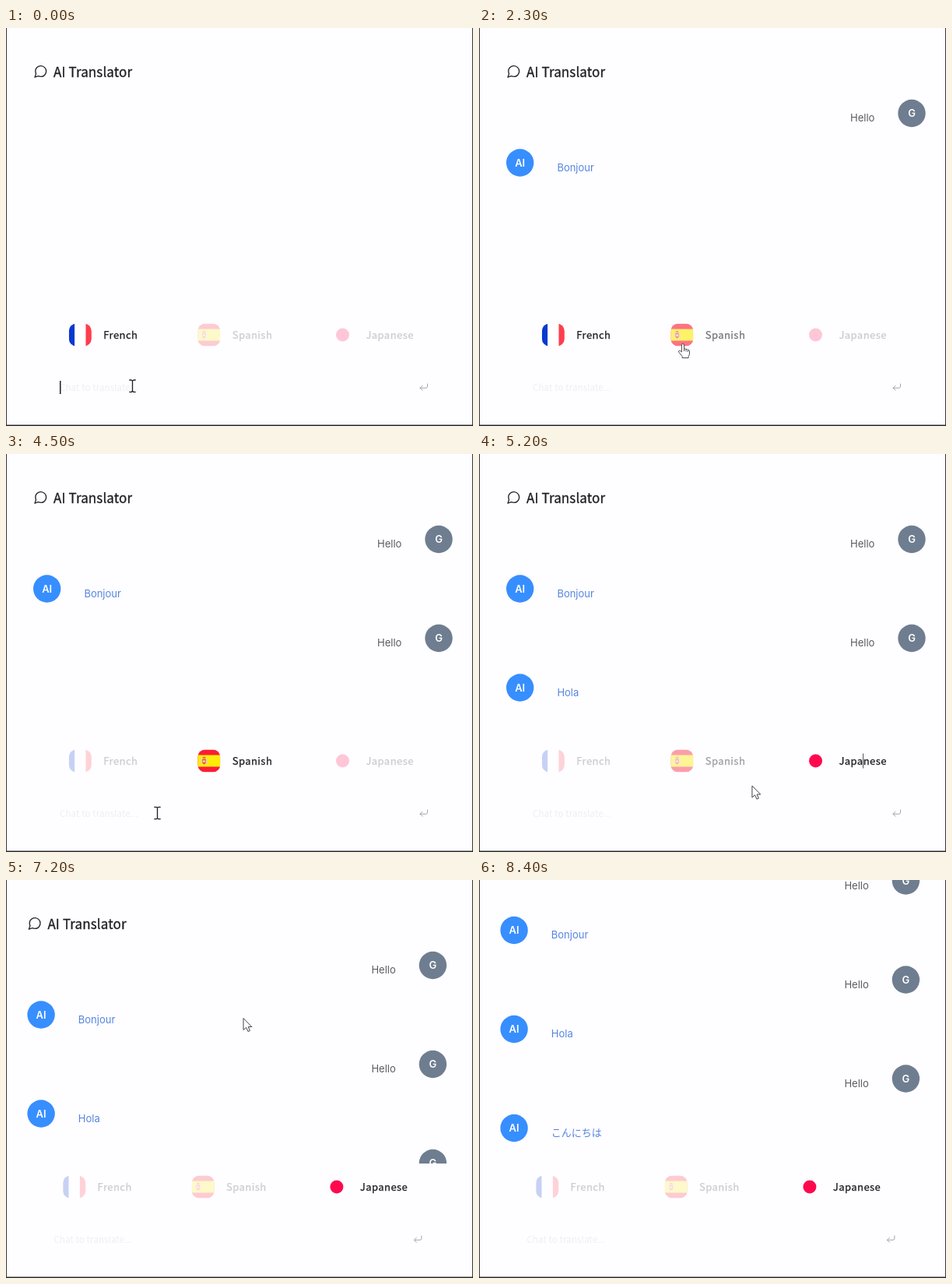
Write an HTML page that moves like this. It is 600x511 px and loops after 9.4 s.

```html
<!DOCTYPE html>
<html lang="en">
<head>
<meta charset="utf-8">
<title>AI Translator</title>
<style>
  html, body { margin: 0; width: 100%; height: 100%; overflow: hidden; background: #fefdff; }
  svg { display: block; }
  .ui { font-family: "Noto Sans CJK JP", "Noto Sans CJK", "Noto Sans", sans-serif; }
  .title { font-size: 17px; letter-spacing: .12px; fill: #1f1d21; stroke: #1f1d21; stroke-width: .3; }
  .tab { font-size: 13px; letter-spacing: .45px; fill: #1c1a1e; stroke: #1c1a1e; stroke-width: .25; }
  .hint { font-size: 11.5px; letter-spacing: .12px; fill: #f1edf3; }
  .chat { font: 13px Inter, "Noto Sans CJK JP", "Noto Sans CJK", sans-serif; }
  .badge { font: 600 13px Inter, sans-serif; fill: #fff; text-anchor: middle; }
  .line { fill: none; stroke-linecap: round; stroke-linejoin: round; }
</style>
</head>
<body>
<svg width="600" height="511" viewBox="0 0 600 511">
  <defs>
    <clipPath id="view"><rect width="600" height="364"/></clipPath>
    <clipPath id="round"><rect width="29" height="29" rx="9.5"/></clipPath>
  </defs>
  <rect width="600" height="511" fill="#fefdff"/>
  <g clip-path="url(#view)">
    <g id="page">
      <path class="line" transform="translate(34.6 46.2) scale(.81)" stroke="#29262b" stroke-width="1.7"
        d="M21 11.5a8.4 8.4 0 0 1-.9 3.8 8.5 8.5 0 0 1-7.6 4.7 8.4 8.4 0 0 1-3.8-.9L3 21l1.9-5.7a8.4 8.4 0 0 1-.9-3.8 8.5 8.5 0 0 1 4.7-7.6 8.4 8.4 0 0 1 3.8-.9h.5a8.5 8.5 0 0 1 8 8z"/>
      <text class="ui title" x="61" y="63">AI Translator</text>
      <g id="messages"></g>
    </g>
  </g>
  <g id="dock">
    <g class="ui" id="tabs"></g>
    <text class="ui hint" id="hint" x="69" y="466">Chat to translate...</text>
    <text class="ui" id="entry" x="69" y="466" font-size="12" fill="#343136"></text>
    <rect id="caret" y="453" width="1.5" height="17" fill="#222"/>
    <path class="line" stroke="#a5a2a8" d="M541.5 457v3.2q0 2-2 2h-7.5m3-3-3 3 3 3"/>
  </g>
  <path id="trace" d="M493.5 384.5v19" stroke="#55525a"/>
  <g id="pointer" stroke-linejoin="round">
    <path id="arrow" fill="#fff" stroke="#444148" d="M0 0V15L3.6 11.8 6 17 8.4 16 6.2 11H10.8Z"/>
    <path id="beam" fill="none" stroke="#1f1d21" stroke-width="1.3" d="M-4.2-7.7h2.7L0-6.7l1.5-1h2.7M0-6.7V6.7M-4.2 7.7h2.7L0 6.7l1.5 1h2.7"/>
    <path id="hand" transform="scale(.95)" fill="#fff" stroke="#444148" d="M-1.7 1.2Q-1.5-.2 0 0t1.6 1.6V7q1.5-1.1 2.6.5 1.5-.9 2.4.7 2.2-.5 2.3 1.6v3.4q0 2-1.4 3.6V19H-.9v-2L-5.3 11.6q-1.2-1.8.3-2.4 1.4-.4 3.3 1.8ZM1.6 7v3M4.2 8v2.3M6.6 9v2"/>
  </g>
  <path d="M.5 0V511M599.5 0V511" stroke="#39373b"/>
  <rect y="509.5" width="600" height="1.5" fill="#29272b"/>
</svg>
<script>
const LOOP = 9400, STEP = 100, DIM = .22, WORD = "Hello";
const el = id => document.getElementById(id);
const show = (node, on) => node.setAttribute("visibility", on ? "visible" : "hidden");
const move = (node, x, y) => node.setAttribute("transform", `translate(${x} ${y})`);
const progress = (t, start, length) => Math.min(1, Math.max(0, (t - start) / length));
const ease = (t, start, length) => {
  const p = progress(t, start, length);
  return p * p * (3 - 2 * p);
};

function add(parent, tag, attrs, text = "") {
  const node = document.createElementNS("http://www.w3.org/2000/svg", tag);
  for (const key in attrs) node.setAttribute(key, attrs[key]);
  node.textContent = text;
  return parent.appendChild(node);
}

const stripe = (g, fill, box) => add(g, "rect", { width: 29, height: 29, ...box, fill });

function drawFrench(g) {
  stripe(g, "#fff");
  stripe(g, "#0839cf", { width: 7.3 });
  stripe(g, "#ff3d4d", { x: 21.7 });
}
function drawSpanish(g) {
  stripe(g, "#fb1d36");
  stripe(g, "#ffec08", { y: 7, height: 15 });
  add(g, "path", { d: "M4 11h1.5v8H4zM11 11h1.5v8H11z", fill: "#f3cfae" });
  add(g, "path", { d: "M6 12h4.5v5q-2.2 4-4.5 0zM6.5 9.5h3.5v1.5h-3.5z", fill: "#dd5a50" });
  add(g, "circle", { cx: 8.2, cy: 15, r: 1.5, fill: "#f8ccd2" });
}
function drawJapanese(g) {
  add(g, "circle", { cx: 14.5, cy: 14.5, r: 8.5, fill: "#ff094e" });
}

// One round: pick a language, type the word, send it, get the reply.
const rounds = [
  { name: "French", x: 80.8, draw: drawFrench, pick: -1000, type: 100, typing: 800, reply: "Bonjour" },
  { name: "Spanish", x: 246.3, draw: drawSpanish, pick: 2500, type: 3300, typing: 500, reply: "Hola" },
  { name: "Japanese", x: 418, draw: drawJapanese, pick: 5000, type: 5400, typing: 200, reply: "こんにちは" }
];

function addMessage(text, at, row) {
  const ai = row % 2, y = 109.5 + row * 63.5, x = ai ? 52.7 : 556;
  const node = add(el("messages"), "g", {});
  add(node, "circle", { cx: x, cy: y, r: 17.7, fill: ai ? "#378eff" : "#6f7d90" });
  add(node, "text", { class: "badge", x, y: y + 4.7 }, ai ? "AI" : "G");
  add(node, "text", { class: "chat", x: ai ? 100.4 : 477, y: y + 10.8, fill: ai ? "#5585e2" : "#5c5961" }, text);
  return { node, at };
}

const messages = rounds.flatMap((round, i) => {
  round.send = round.type + round.typing + 400;
  round.drop = rounds[i + 1]?.pick ?? LOOP;
  round.tab = add(el("tabs"), "g", {});
  const flag = add(round.tab, "g", { transform: `translate(${round.x} 379.5)`, "clip-path": "url(#round)" });
  round.draw(flag);
  add(round.tab, "text", { class: "tab", x: round.x + 44.4, y: 398.8 }, round.name);
  return [addMessage(WORD, round.send, 2 * i), addMessage(round.reply, round.send + 500, 2 * i + 1)];
});

function tabOpacity(t, { pick, drop }) {
  const hover = ease(t, pick - 400, 200), chosen = ease(t, pick, 200), gone = ease(t, drop, 300);
  return DIM + (1 - DIM) * (hover + chosen) / 2 * (1 - gone);
}

const home = { x: 162.5, y: 459.7 };
const hops = [
  { at: 800, length: 200, x: 262, y: 412 },
  { at: 2100, length: 200, x: 262, y: 405.5 },
  { at: 2600, length: 300, x: 150, y: 461 },
  { at: 3500, length: 300, x: 194.5, y: 461 },
  { at: 4500, length: 400, x: 493, y: 394 },
  { at: 5000, length: 420, x: 187, y: 463 },
  { at: 6200, length: 800, x: 305, y: 177.5 },
  { at: 7200, length: 400, x: 311, y: 175.5 }
];

function pointerAt(t) {
  let { x, y } = home;
  for (const hop of hops) {
    const p = ease(t, hop.at, hop.length);
    x += (hop.x - x) * p;
    y += (hop.y - y) * p;
  }
  return { x, y };
}

function pointerShape({ x, y }) {
  const inTabs = y > 380 && y < 408;
  if (y > 440 || inTabs && x > 462) return "beam";
  return inTabs && x > 246 && x < 275 ? "hand" : "arrow";
}

function render(t) {
  const last = rounds[rounds.length - 1];
  const shift = t > last.send ? -7.6 : 0;
  move(el("page"), shift, -107.7 * ease(t, 7200, 400) - .8 * ease(t, 8100, 300));
  move(el("dock"), shift, 0);
  for (const { node, at } of messages) show(node, t >= at);
  for (const round of rounds) round.tab.setAttribute("opacity", tabOpacity(t, round));

  const writing = rounds.find(r => t >= r.type && t < r.send);
  const count = writing ? Math.ceil(WORD.length * progress(t, writing.type, writing.typing)) : 0;
  const entry = el("entry"), caret = el("caret");
  entry.textContent = WORD.slice(0, count);
  caret.setAttribute("x", 69 + (count ? entry.getComputedTextLength() + 1 : 0));
  show(caret, t < rounds[0].type || count > 0);
  show(el("hint"), count === 0);

  const point = pointerAt(t), shape = pointerShape(point);
  for (const id of ["arrow", "beam", "hand"]) show(el(id), id === shape && t < 8200);
  move(el("pointer"), point.x, point.y);
  show(el("trace"), t > last.pick && t < last.type);
}

const start = performance.now();
function tick() {
  const t = (performance.now() - start) % LOOP;
  render(Math.floor(t / STEP) * STEP);
  requestAnimationFrame(tick);
}
tick();
</script>
</body>
</html>
```
